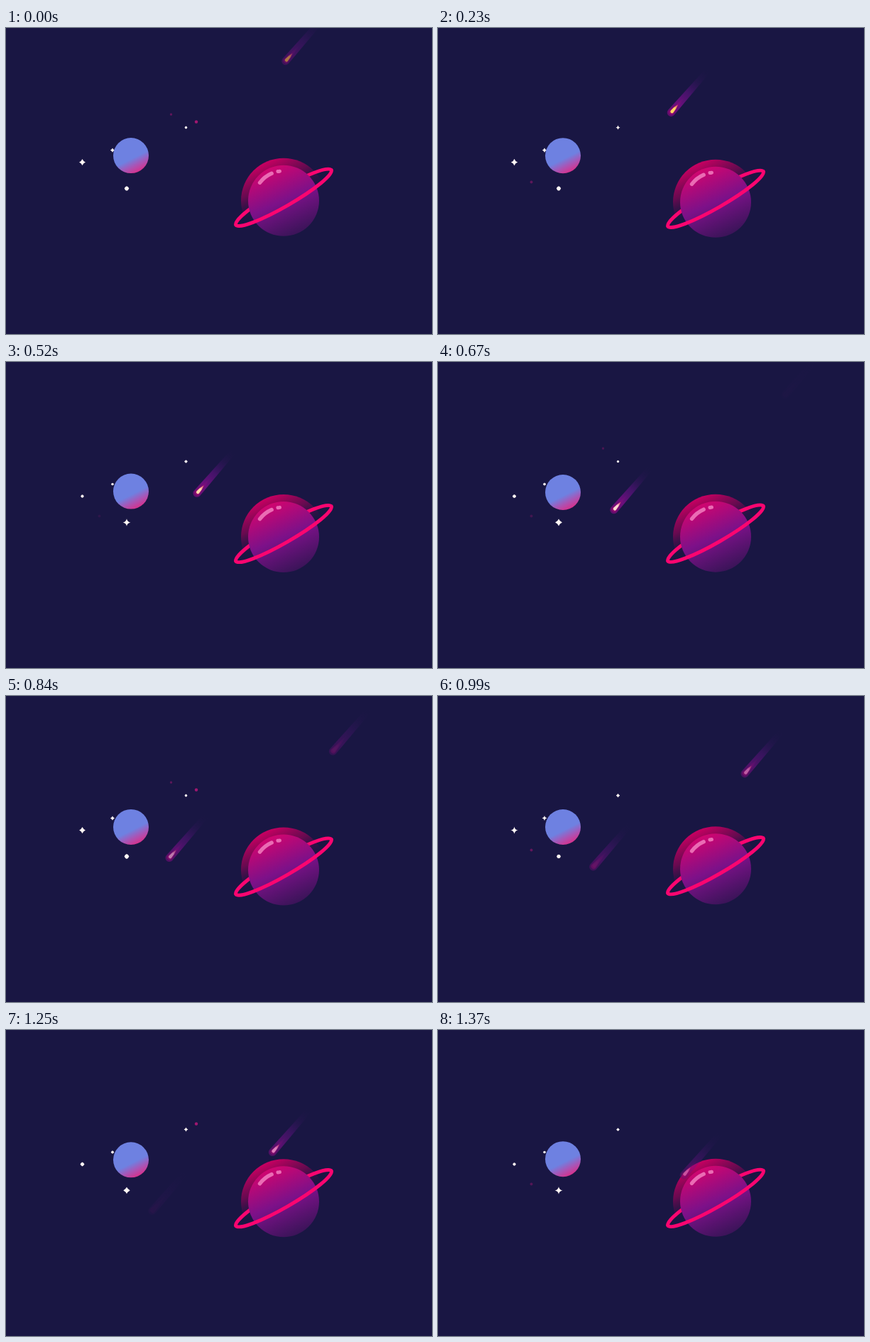
Animation, 600 px wide and 432 px high, one loop 1470 ms. Source, as an HTML page with a canvas:

```html
<!DOCTYPE html>
<html>
<head>
<meta charset="utf-8">
<title>Planets and comets</title>
<style>
html, body { margin: 0; width: 100%; height: 100%; overflow: hidden; background: #191643; }
canvas { display: block; }
</style>
</head>
<body>
<canvas id="stage" width="600" height="432"></canvas>
<script>
const ctx = document.getElementById('stage').getContext('2d');
const TAU = Math.PI * 2;
const LOOP = 1470, MOVING = 1370; // the last pose is held until the loop ends

// 0 before `from`, 1 after `to`, linear between
const ramp = (t, from, to) => Math.min(1, Math.max(0, (t - from) / (to - from)));
// Cosine wave that is 1 at `peak`
const wave = (t, peak, period) => Math.cos(TAU * (t - peak) / period);

function gradient(x0, y0, x1, y1, ...colors) {
  const g = ctx.createLinearGradient(x0, y0, x1, y1);
  colors.forEach((c, i) => g.addColorStop(i / (colors.length - 1), c));
  return g;
}

function disc(x, y, r, fill) {
  ctx.fillStyle = fill;
  ctx.beginPath();
  ctx.arc(x, y, r, 0, TAU);
  ctx.fill();
}

function at(x, y, draw) {
  ctx.save();
  ctx.translate(x, y);
  draw();
  ctx.restore();
}

const stars = [
  { x: 107.5, y: 189.5, size: 3.6, swing: 1.5, peak: 130 },
  { x: 150, y: 172.5, size: 2.6, swing: .8, peak: 130 },
  { x: 170, y: 226.5, size: 4.1, swing: 1.3, peak: 550 },
  { x: 253.5, y: 140.5, size: 2.4, swing: .8, peak: 300 }
];
const dots = [
  { x: 268, y: 132.5, r: 2.2, glow: .8, peak: 0, period: 415 },
  { x: 232.5, y: 122, r: 1.7, glow: .45, peak: 780, period: 820 },
  { x: 131.5, y: 217.5, r: 2, glow: .45, peak: 200, period: 405 }
];

// Four-pointed when large, nearly round when small
function drawStar({ x, y, size, swing, peak }, t) {
  const pulse = wave(t, peak, 850);
  const s = size + swing * pulse;
  const bend = s * (.9 - .75 * (pulse + 1) / 2);
  at(x, y, () => {
    ctx.fillStyle = '#fff6f4';
    ctx.beginPath();
    ctx.moveTo(s, 0);
    ctx.quadraticCurveTo(bend, bend, 0, s);
    ctx.quadraticCurveTo(-bend, bend, -s, 0);
    ctx.quadraticCurveTo(-bend, -bend, 0, -s);
    ctx.quadraticCurveTo(bend, -bend, s, 0);
    ctx.fill();
  });
}

function drawDot({ x, y, r, glow, peak, period }, t) {
  ctx.globalAlpha = glow * Math.max(0, wave(t, peak, period));
  disc(x, y, r, '#c3187c');
  ctx.globalAlpha = 1;
}

function drawComet(x, y, alpha, flameAlpha, flameColor) {
  const length = 80;
  at(x, y, () => {
    ctx.rotate(-49 * Math.PI / 180);
    ctx.globalAlpha = alpha;
    ctx.fillStyle = gradient(-5, 0, length, 0,
      'rgba(105,12,112,.9)', 'rgba(120,14,134,.85)', 'rgba(96,18,130,.6)', 'rgba(60,20,100,.25)', 'rgba(26,22,66,0)');
    ctx.beginPath();
    ctx.arc(0, 0, 5.5, Math.PI / 2, Math.PI * 1.5);
    ctx.lineTo(length, -4);
    ctx.lineTo(length, 4);
    ctx.fill();
    ctx.fillStyle = gradient(0, 0, 30, 0, 'rgba(160,10,110,.7)', 'rgba(140,10,130,0)');
    ctx.beginPath();
    ctx.arc(1, 0, 3.7, Math.PI / 2, Math.PI * 1.5);
    ctx.lineTo(30, 0);
    ctx.fill();
    ctx.globalAlpha = flameAlpha;
    ctx.fillStyle = gradient(0, 0, 15, 0, flameColor, flameColor, '#e0406a');
    ctx.beginPath();
    ctx.arc(2, 0, 2.3, Math.PI / 2, Math.PI * 1.5);
    ctx.quadraticCurveTo(9, -2, 15, 0);
    ctx.quadraticCurveTo(9, 2, 2, 2.3);
    ctx.fill();
  });
}

// Brakes along a logistic curve while it burns out
function drawFirstComet(t) {
  const x = 190 + 600 / (1 + 1.94 * Math.exp(.00235 * t));
  const fadeIn = ramp(t, -230, 230);
  drawComet(x, 46.5 + 1.11 * (394 - x),
    fadeIn * (1 - ramp(t, 700, 1300)), fadeIn * (1 - ramp(t, 700, 1000)),
    `rgb(255,215,${Math.min(230, 40 + t / 4)})`);
}

// Speeds up towards the ringed planet
function drawSecondComet(t) {
  const s = t - 670, x = 489 - .155 * s - .00007 * s * s;
  const fadeOut = 1 - ramp(t, 1150, 1580);
  drawComet(x, 143 + 1.11 * (402 - x),
    fadeOut * ramp(t, 660, 1140), fadeOut * ramp(t, 830, 1130), '#ff9fd6');
}

function drawSmallPlanet(t) {
  at(176, 182.5 - 2.6 * wave(t, 100, 1650), () =>
    disc(0, 0, 25, gradient(2, 4, 11, 22, '#6e81e1', '#a657b8', '#d4338f')));
}

function strokeArc(rx, ry, tilt, from, to, width, color) {
  ctx.lineWidth = width;
  ctx.strokeStyle = color;
  ctx.beginPath();
  ctx.ellipse(0, 0, rx, ry, tilt, from, to);
  ctx.stroke();
}

function drawRing(from, to) {
  at(0, -4.5, () => strokeArc(77.5, 12.5, -Math.PI / 6, from, to, 5, '#fb0570'));
}

function drawRingedPlanet(t) {
  at(391, 244.4 + 2.6 * wave(t, 520, 1800), () => {
    ctx.lineCap = 'round';
    disc(0, 0, 60, gradient(-26, -52, 0, 0, '#c20060', 'rgba(130,6,84,.75)', 'rgba(60,14,70,0)'));
    drawRing(Math.PI, TAU);
    disc(0, 0, 50, gradient(-20, -46, 21, 46, '#d0056f', '#7c1189', '#3a1458'));
    drawRing(0, Math.PI);
    strokeArc(42, 42, 0, 3.79, 4.3, 5.4, '#ea6cb4');
    strokeArc(42, 42, 0, 4.52, 4.58, 5, '#ea6cb4');
  });
}

function render(now) {
  const t = Math.min(now % LOOP, MOVING);
  ctx.fillStyle = '#191643';
  ctx.fillRect(0, 0, 600, 432);
  dots.forEach(d => drawDot(d, t));
  stars.forEach(s => drawStar(s, t));
  drawSmallPlanet(t);
  drawRingedPlanet(t);
  drawFirstComet(t);
  drawSecondComet(t);
}

const start = performance.now();
function tick() {
  render(performance.now() - start);
  requestAnimationFrame(tick);
}
tick();
</script>
</body>
</html>
```
